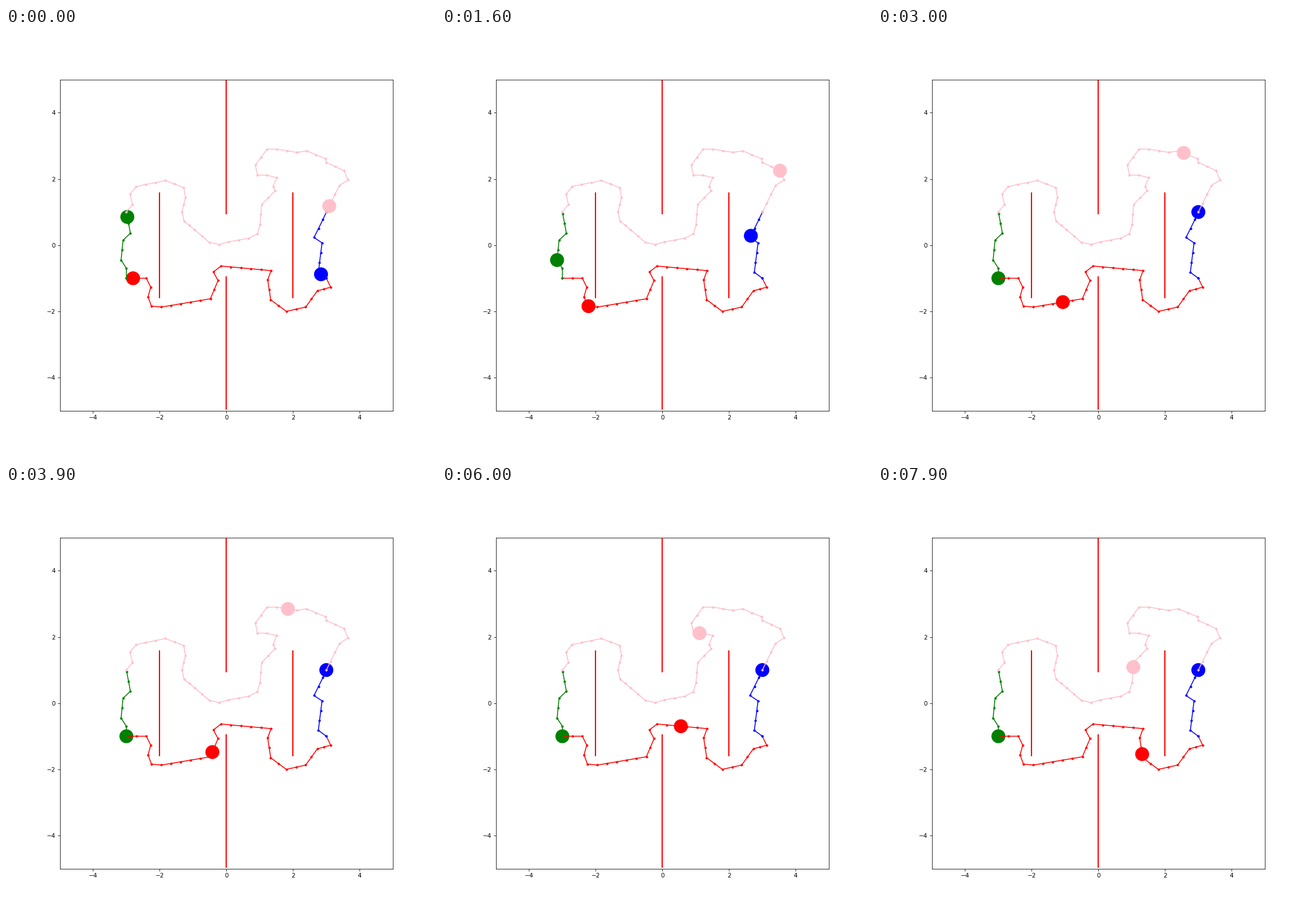
Animation of 748x748 px, one loop 8 s. Source, as a matplotlib script:

```python
import numpy as np
import matplotlib.pyplot as plt
from matplotlib.animation import FuncAnimation

FRAMES, INTERVAL = 80, 100
MAX_STEP = 0.32  # longest hop between two waypoints

# colour, distance covered at the start, distance per frame, corners
ROBOTS = [
    ("red", 0.2, 0.0832,
     [(-3, -1), (-2.4, -1), (-2.27, -1.27), (-2.35, -1.56), (-2.25, -1.84),
      (-1.95, -1.87), (-0.48, -1.62), (-0.25, -1.07), (-0.39, -0.81),
      (-0.16, -0.63), (1.34, -0.77), (1.24, -1.05), (1.33, -1.65), (1.8, -2),
      (2.38, -1.87), (2.73, -1.38), (3.13, -1.27), (3, -1)]),
    ("green", 0.1, 0.088,
     [(-2.99, 0.95), (-2.88, 0.36), (-3.1, 0.15), (-3.16, -0.45),
      (-3, -0.7), (-3, -1)]),
    ("blue", 0.2, 0.084,
     [(3, -1), (2.76, -0.82), (2.87, 0.07), (2.63, 0.23), (2.9, 0.78), (3, 1)]),
    ("pink", 0.2, 0.0817,
     [(3, 1), (3.39, 1.8), (3.65, 1.97), (3.53, 2.25), (3, 2.5), (2.97, 2.61),
      (2.41, 2.85), (2.12, 2.8), (1.52, 2.9), (1.22, 2.9), (0.87, 2.42),
      (0.93, 2.12), (1.22, 2.11), (1.51, 2.04), (1.4, 1.77), (1.46, 1.64),
      (1.06, 1.23), (1.01, 0.62), (0.93, 0.34), (0.67, 0.21), (0.07, 0.1),
      (-0.21, 0.02), (-0.51, 0.08), (-0.96, 0.47), (-1.27, 0.72),
      (-1.33, 1.01), (-1.23, 1.44), (-1.28, 1.74), (-1.83, 1.95),
      (-2.71, 1.77), (-2.89, 1.54), (-2.82, 1.23), (-3, 1)]),
]


def waypoints(corners):
    """Split every edge into equal hops no longer than MAX_STEP."""
    pts = [np.array(corners[0], float)]
    for a, b in zip(corners, corners[1:]):
        a, b = np.array(a), np.array(b)
        n = int(np.ceil(np.hypot(*(b - a)) / MAX_STEP))
        pts += [a + (b - a) * k / n for k in range(1, n + 1)]
    return np.array(pts)


def arc_lengths(pts):
    return np.r_[0, np.cumsum(np.hypot(*np.diff(pts, axis=0).T))]


fig, ax = plt.subplots(figsize=(10, 10), dpi=74.8)
ax.set(xlim=(-5, 5), ylim=(-5, 5))
ax.set_xticks(range(-4, 5, 2))
ax.set_yticks(range(-4, 5, 2))

for side in (-1, 1):
    ax.plot([2 * side] * 2, [-1.58, 1.58], color="red", lw=2)
    ax.plot([0, 0], [0.955 * side, 4.955 * side], color="red", lw=2)

movers = []
for color, start, speed, corners in ROBOTS:
    pts = waypoints(corners)
    ax.plot(*pts.T, ".-", color=color)
    disc = ax.add_patch(plt.Circle(pts[0], 0.2, color=color))
    movers.append((disc, start, speed, pts, arc_lengths(pts)))


def update(frame):
    for disc, start, speed, pts, arc in movers:
        s = start + speed * frame
        disc.center = [np.interp(s, arc, axis) for axis in pts.T]
    return [m[0] for m in movers]


anim = FuncAnimation(fig, update, frames=FRAMES, interval=INTERVAL,
                     repeat=True, repeat_delay=0)
plt.show()
```
